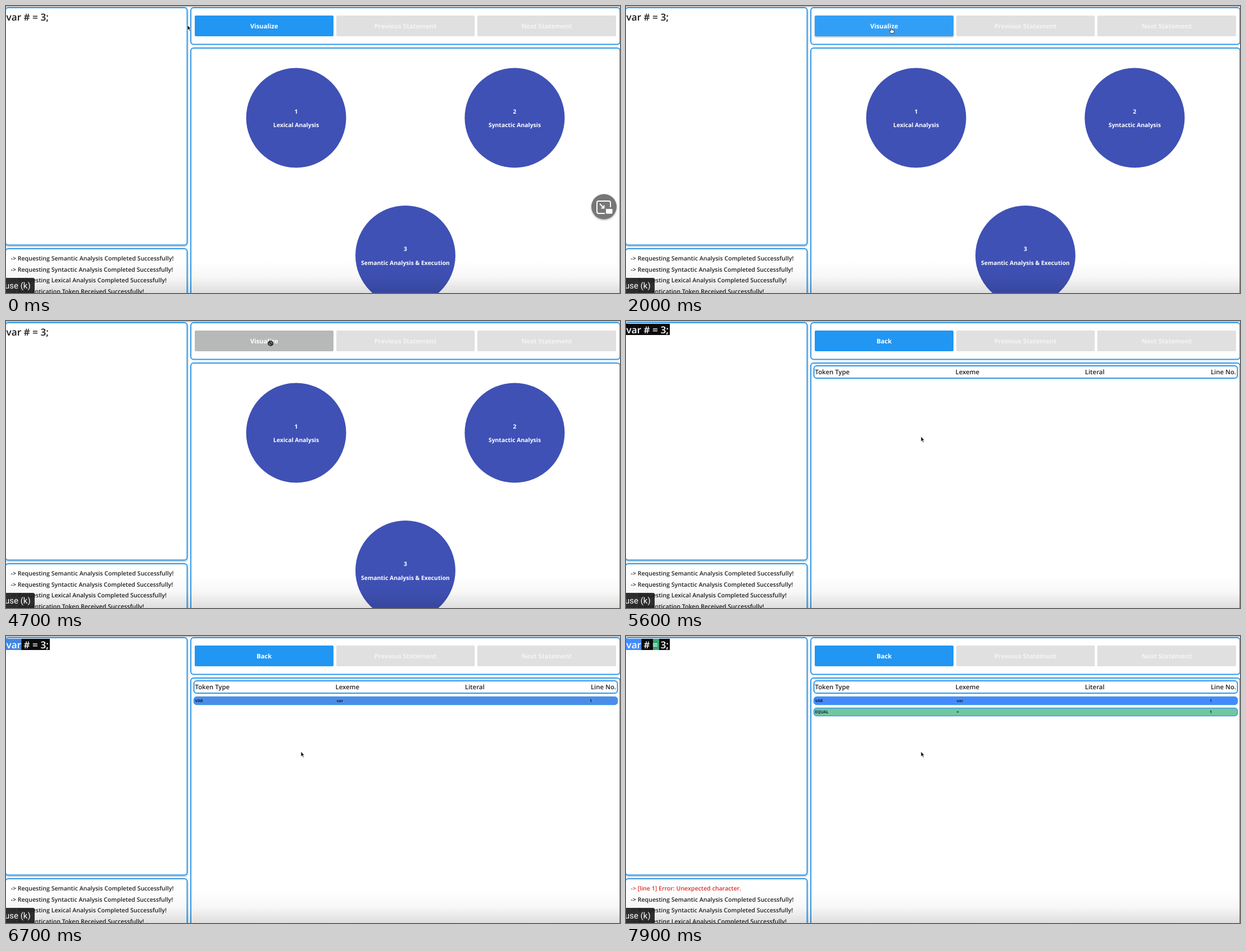
An HTML page that plays this animation: 1093x512 px, repeating every 8000 ms.

```html
<!DOCTYPE html>
<html lang="en">
<head>
<meta charset="utf-8">
<title>Lexical analysis visualizer</title>
<style>
html, body { margin: 0; width: 100%; height: 100%; overflow: hidden; background: #fff; }
svg { display: block; width: 1093px; height: 512px; }
text { font-family: "Open Sans", "Noto Sans", sans-serif; font-weight: 600; text-rendering: geometricPrecision; white-space: pre; }
.panel { fill: #fff; stroke: #2f97e8; stroke-width: 2; }
.btn { fill: #e0e0e0; }
.btn-text { fill: #f4f4f4; font-size: 11.3px; font-weight: 700; text-anchor: middle; }
.phase circle { fill: #3f51b5; }
.phase text { fill: #fff; font-size: 10.4px; font-weight: 700; text-anchor: middle; }
.code { font-size: 17.2px; fill: #1c1c1c; }
.log { font-size: 10.6px; fill: #222; }
.log.error { fill: #d93025; }
.head { font-size: 11.4px; fill: #222; }
.row text { font-size: 7.2px; font-weight: 700; fill: #16243a; }
.tip { font-family: Roboto, sans-serif; font-weight: 400; font-size: 15px; fill: #fff; }
</style>
</head>
<body>
<svg viewBox="0 0 1093 512" xmlns="http://www.w3.org/2000/svg">
  <defs>
    <linearGradient id="shade" x1="0" y1="0" x2="0" y2="1">
      <stop offset="0" stop-color="#000" stop-opacity="0"/>
      <stop offset=".5" stop-color="#000" stop-opacity=".03"/>
      <stop offset="1" stop-color="#000" stop-opacity=".13"/>
    </linearGradient>
    <filter id="soft" x="-20%" y="-20%" width="140%" height="160%">
      <feDropShadow dx="0" dy="1.5" stdDeviation="1.5" flood-opacity=".3"/>
    </filter>
  </defs>
  <rect width="1093" height="512" fill="#fff"/>
  <rect width="1093" height="2" fill="#c4c6c8"/>
  <g filter="url(#soft)">
    <rect class="panel" x="-1" y="3" width="323.5" height="423.5" rx="5"/>
    <rect class="panel" x="-1" y="433" width="323.5" height="100" rx="5"/>
  </g>
  <rect class="panel" x="329" y="3" width="764" height="65.5" rx="5"/>
  <rect class="panel" x="329" y="75" width="764" height="460" rx="5"/>

  <g id="buttons">
    <rect id="main" class="btn" x="336" y="17" width="247" height="37" rx="2"/>
    <rect class="btn" x="588" y="17" width="246.500" height="37" rx="2"/>
    <rect class="btn" x="839" y="17" width="247" height="37" rx="2"/>
    <text id="mainText" class="btn-text" x="459.500" y="40" style="fill:#fff"></text>
    <text class="btn-text" x="711" y="40">Previous Statement</text>
    <text class="btn-text" x="962.500" y="40">Next Statement</text>
  </g>

  <g id="phases"></g>
  <text id="plainCode" class="code" x="0.500" y="26">var # = 3;</text>

  <g id="tokens">
    <rect class="panel" x="334.500" y="80" width="754" height="22" rx="5"/>
    <text class="head" x="336.500" y="95">Token Type</text>
    <text class="head" x="586.500" y="95">Lexeme</text>
    <text class="head" x="817" y="95">Literal</text>
    <text class="head" x="1086" y="95" text-anchor="end">Line No.</text>
    <rect x="0" y="5" width="78" height="20" fill="#0b0b0b"/>
    <rect id="varMark" x="0" y="5" width="27.500" height="20"/>
    <rect id="equalMark" x="48" y="5" width="11" height="20"/>
    <text class="code" x="0.500" y="21.500" style="fill:#fff">var # = 3;</text>
  </g>

  <g id="logs"></g>
  <rect y="455" width="1093" height="57" fill="url(#shade)"/>
  <path d="M0 485H48a3 3 0 0 1 3 3V512H0z" fill="#1f1f1f" fill-opacity=".92"/>
  <text class="tip" x="-2" y="503.500">use (k)</text>

  <g id="pip" filter="url(#soft)">
    <circle cx="1064.500" cy="358" r="22.500" fill="#777"/>
    <path d="M1066 370H1055a3 3 0 0 1-3-3V351a3 3 0 0 1 3-3H1073a3 3 0 0 1 3 3V359M1057 353l7 7M1064.500 355.500v5h-5" fill="none" stroke="#fff" stroke-width="2"/>
    <rect x="1068" y="362" width="11.500" height="8.500" rx="1" fill="#fff"/>
  </g>

  <g id="cursor">
    <path id="arrow" d="M0 0V9.200L2.100 7.300 3.700 10.700 5.200 10 3.700 6.700H6.300z" fill="#111" stroke="#fff" stroke-width=".7"/>
    <path id="hand" d="M-1.800 .8V-4a1 1 0 0 1 2 0V-1.300L3.600-.7Q4.500-.4 4.400 .6L3.700 4.800H-1.200L-4.200 1.300Q-4.200-.2-2.900 .2z" fill="#fff" stroke="#222" stroke-width=".9"/>
    <g id="blocked" fill="none">
      <circle r="5.200" fill="#fff"/>
      <circle r="4.200" fill="#777" stroke="#222" stroke-width="1.800"/>
      <path d="M-2.800-2.800L2.800 2.800" stroke="#222" stroke-width="1.800"/>
    </g>
  </g>
</svg>
<script>
const LOOP = 8000;
const BLUE = [33, 150, 243], HOVER = [48, 159, 247], GRAY = [224, 224, 224];
const $ = id => document.getElementById(id);

function add(parent, tag, attrs, content) {
  const el = document.createElementNS("http://www.w3.org/2000/svg", tag);
  for (const key in attrs) el.setAttribute(key, attrs[key]);
  if (content) el.textContent = content;
  return parent.appendChild(el);
}

function addPhase(x, y, n, title) {
  const g = add($("phases"), "g", { class: "phase" });
  add(g, "circle", { cx: x, cy: y, r: 89 });
  add(g, "text", { x, y: y - 8 }, n);
  add(g, "text", { x, y: y + 16.5 }, title);
}
addPhase(516.5, 199.5, "1", "Lexical Analysis");
addPhase(905.5, 199.5, "2", "Syntactic Analysis");
addPhase(711, 445, "3", "Semantic Analysis & Execution");

const LOG_STEP = 19.6;
const oldLogs = add($("logs"), "g", {});
["Requesting Semantic Analysis Completed", "Requesting Syntactic Analysis Completed",
 "Requesting Lexical Analysis Completed", "Authentication Token Received"]
  .forEach((line, i) => add(oldLogs, "text",
    { class: "log", x: 8.5, y: 454 + i * LOG_STEP }, `-> ${line} Successfully!`));
const error = add($("logs"), "text", { class: "log error", x: 8.5, y: 454 },
  "-> [line 1] Error: Unexpected character.");

function addRow(y, type, lexeme) {
  const g = add($("tokens"), "g", { class: "row" });
  const box = add(g, "rect", { x: 334.5, y, width: 754, height: 14, rx: 5, stroke: "#3f97e8", "stroke-width": 1.5 });
  [[336.5, type], [588.5, lexeme], [1039, "1"]]
    .forEach(([x, s]) => add(g, "text", { x, y: y + 9.5 }, s));
  return { g, box };
}
const tokens = [
  { ...addRow(108.5, "VAR", "var"), mark: $("varMark"), start: 6300, mid: [76, 140, 232], end: [68, 138, 255], markMid: [66, 133, 226] },
  { ...addRow(128.5, "EQUAL", "="), mark: $("equalMark"), start: 7500, mid: [113, 199, 161], end: [105, 215, 165], markMid: [55, 165, 115] }
];

const smooth = u => u * u * (3 - 2 * u);

// Each stop is [time, values]; values are interpolated between stops.
function track(stops, t, ease = u => u) {
  const i = stops.findIndex(s => s[0] > t);
  if (i === 0) return stops[0][1];
  if (i < 0) return stops[stops.length - 1][1];
  const [t0, a] = stops[i - 1], [t1, b] = stops[i];
  const u = ease((t - t0) / (t1 - t0));
  return a.map((v, k) => v + (b[k] - v) * u);
}
const rgb = c => `rgb(${c.map(Math.round).join()})`;
const show = (el, on) => { el.style.display = on ? "" : "none"; };

const path = [
  [0, [323, 34]], [100, [328, 34]], [300, [340, 34]], [900, [420, 35]], [1200, [420, 35]],
  [1600, [452, 102]], [2000, [473, 44]], [4500, [473, 44]], [4600, [471, 40]],
  [4800, [471, 40]], [5300, [525, 206]]
];
const fill = [
  [250, BLUE], [450, HOVER], [1300, HOVER], [1450, BLUE], [1850, BLUE], [2000, HOVER],
  [4500, HOVER], [4700, [183, 184, 184]], [4900, GRAY], [5150, GRAY], [5300, BLUE]
];

function draw(t) {
  const [x, y] = track(path, t, smooth);
  const inButton = x > 336 && x < 583 && y > 17 && y < 54;
  const disabled = t >= 4500 && t < 5200;
  const table = t >= 5400;
  const hovering = inButton && !disabled;

  $("cursor").setAttribute("transform", `translate(${x} ${y})`);
  show($("arrow"), !inButton);
  show($("hand"), hovering);
  show($("blocked"), inButton && disabled);

  $("main").style.fill = rgb(track(fill, t));
  if (hovering) $("main").setAttribute("filter", "url(#soft)");
  else $("main").removeAttribute("filter");
  $("mainText").textContent = table ? "Back" : "Visualize";
  $("pip").style.opacity = track([[300, [1]], [1060, [0]]], t)[0];

  show($("phases"), !table);
  show($("plainCode"), !table);
  show($("tokens"), table);

  for (const k of tokens) {
    const age = t - k.start;
    show(k.g, age >= 0);
    show(k.mark, age >= 0);
    k.box.style.fill = rgb(track([[0, [255, 255, 255]], [400, k.mid], [800, k.end]], age));
    k.mark.style.fill = rgb(track([[0, [11, 11, 11]], [400, k.markMid], [800, k.end]], age));
  }

  const failed = t >= 7300;
  show(error, failed);
  oldLogs.setAttribute("transform", `translate(0 ${failed ? LOG_STEP : 0})`);
}

const begin = performance.now();
function tick() {
  draw((performance.now() - begin) % LOOP);
  requestAnimationFrame(tick);
}
draw(0);
requestAnimationFrame(tick);
</script>
</body>
</html>
```
